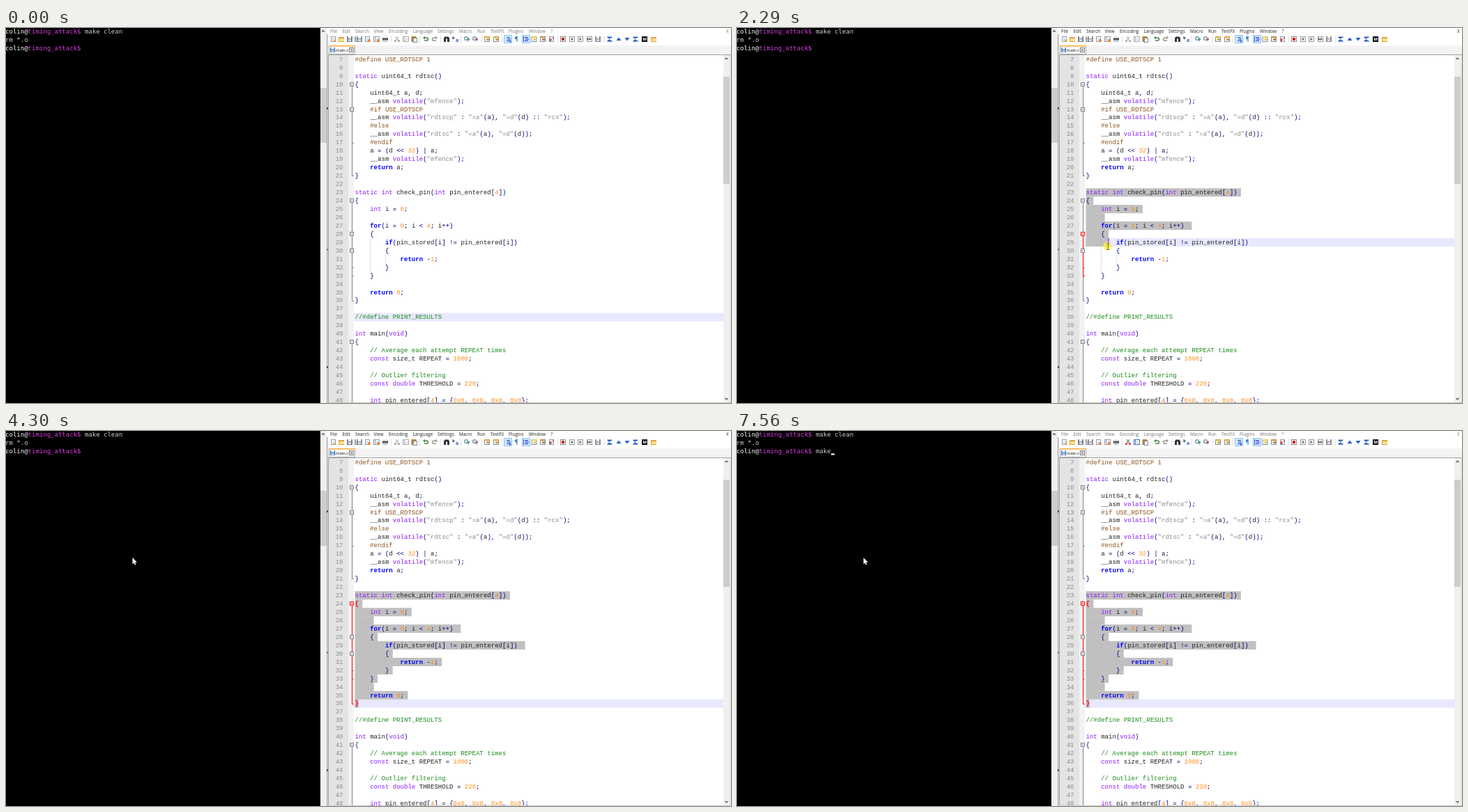
An HTML page with a canvas that plays this animation: 1040x539 px, repeating every 8000 ms.

```html
<!DOCTYPE html>
<html lang="en">
<head>
<meta charset="utf-8">
<title>Timing attack demo</title>
<style>
html, body { margin: 0; width: 100%; height: 100%; overflow: hidden; background: #fff; }
canvas { display: block; }
</style>
</head>
<body>
<canvas id="stage" width="1040" height="539"></canvas>
<script>
const c = document.getElementById('stage').getContext('2d');
const LOOP = 8000, FIRST = 7, X0 = 500.5, CW = 5.425, LH = 11.955;
const MONO = '9.04px "Liberation Mono", monospace';
const TERM = '9px "DejaVu Sans Mono", monospace';
const UI = '"Open Sans", sans-serif';

const code = `#define USE_RDTSCP 1

static uint64_t rdtsc()
{
    uint64_t a, d;
    __asm volatile("mfence");
    #if USE_RDTSCP
    __asm volatile("rdtscp" : "=a"(a), "=d"(d) :: "rcx");
    #else
    __asm volatile("rdtsc" : "=a"(a), "=d"(d));
    #endif
    a = (d << 32) | a;
    __asm volatile("mfence");
    return a;
}

static int check_pin(int pin_entered[4])
{
    int i = 0;
    ${''}
    for(i = 0; i < 4; i++) ${''}
    {
        if(pin_stored[i] != pin_entered[i]) ${''}
        {
            return -1;
        }
    }
    ${''}
    return 0;
}

//#define PRINT_RESULTS

int main(void)
{
    // Average each attempt REPEAT times
    const size_t REPEAT = 1000;

    // Outlier filtering
    const double THRESHOLD = 220;

    int pin_entered[4] = {0x0, 0x0, 0x0, 0x0};`.split('\n');

const folds = [[10, 21], [13, 17], [24, 36], [28, 33], [30, 32], [41, 60]];
const lineY = n => 45 + (n - FIRST) * LH;
const colX = k => X0 + k * CW;

function rect(color, x, y, w, h) { c.fillStyle = color; c.fillRect(x, y, w, h); }
function frame(color, x, y, w, h, fill) {
  if (fill) rect(fill, x, y, w, h);
  c.strokeStyle = color; c.lineWidth = 1;
  c.strokeRect(x + .5, y + .5, w - 1, h - 1);
}
function poly(color, ...p) {
  c.beginPath();
  for (let i = 0; i < p.length; i += 2) c.lineTo(p[i], p[i + 1]);
  c.closePath();
  c.fillStyle = color; c.fill();
}
function disc(color, x, y, r) {
  c.beginPath(); c.arc(x, y, r, 0, 7); c.fillStyle = color; c.fill();
}
function text(s, x, y, color, font) {
  c.font = font; c.fillStyle = color; c.fillText(s, x, y);
}

// --- syntax colouring ---
const token = /\/\/.*|#.*|"[^"]*"|\b\d\w*|[A-Za-z_]\w*|[^\s\w"]+/g;
function style(s) {
  if (s.startsWith('//')) return ['#198c19'];
  if (s[0] === '#') return ['#8c531a'];
  if (s[0] === '"') return ['#8c8c8c'];
  if (/^\d/.test(s)) return ['#ff8c1a'];
  if (/^(return|for|if)$/.test(s)) return ['#0000ff', 'bold '];
  if (/^(static|int|volatile|const|double|void)$/.test(s)) return ['#8c1aff'];
  if (/^\w/.test(s)) return ['#222'];
  return ['#000080'];
}
const tokens = code.map(l => [...l.matchAll(token)].map(m => [m[0], m.index, ...style(m[0])]));

// --- toolbar icons, each drawn around its centre x ---
const page = (x, col = '#8a9bb0') => {
  frame(col, x - 3, 12, 7, 8, '#fff');
  rect('#b8c8dc', x - 1, 15, 3, 1); rect('#b8c8dc', x - 1, 17, 3, 1);
};
const folder = x => {
  rect('#d9a441', x - 4, 13, 8, 7); rect('#ffe08a', x - 3, 15, 7, 4);
};
const disk = (x, col = '#7d8288') => {
  rect(col, x - 4, 12, 8, 8); rect('#fff', x - 2, 12, 4, 3); rect('#dde', x - 2, 16, 4, 3);
};
const curl = (x, d, col) => {
  c.strokeStyle = col; c.lineWidth = 1.6;
  c.beginPath(); c.moveTo(x - 3 * d, 14); c.lineTo(x + 1.5 * d, 14);
  c.arc(x + 1.5 * d, 16, 2, -1.57, 1.57, d < 0); c.lineTo(x - 2 * d, 18); c.stroke();
  poly(col, x - 4 * d, 14, x - d, 11.5, x - d, 16.5);
};
const lens = (x, col) => {
  c.strokeStyle = '#6b88a8'; c.lineWidth = 1.2;
  c.beginPath(); c.arc(x - 1, 15, 2.4, 0, 7); c.moveTo(x + 1, 17); c.lineTo(x + 3, 19); c.stroke();
  rect(col, x + 1, 15, 3, 2);
};
const pane = (x, col) => {
  frame('#7c8ca0', x - 4, 12, 8, 8, '#fff');
  rect(col, x - 4, 12, 8, 2); rect(col, x - 1, 15, 4, 3);
};
const lines = (x, col) => [0, 1, 2].forEach(i => rect(col, x - 2 + i % 2, 13 + i * 2.4, 5, 1.2));
const pressed = x => frame('#8fc4ee', x - 6, 10, 12, 12, '#d2e9fb');
const sigma = x => {
  rect('#2d5fc4', x - 3.5, 12.5, 7, 1.6); rect('#2d5fc4', x - 3.5, 18, 7, 1.6);
  poly('#2d5fc4', x - 3, 14, x + 2, 14, x - 1, 16, x + 2, 18, x - 3, 18, x, 16);
};
const button = (x, col) => frame(col, x - 4, 12, 8, 8, '#fff');

function toolbar(canCut) {
  page(469); disc('#f0a040', 472, 18, 1.6);
  folder(481); disk(493); disk(504, '#9aa'); disk(507, '#8b9096');
  page(518); disc('#f08030', 521, 18, 2);
  page(530); page(532); disc('#f08030', 534, 18, 2);
  rect('#555', 540, 14, 8, 4); rect('#eee', 541, 11.5, 6, 3); rect('#b9c4d4', 541, 17, 6, 3);

  const cut = canCut ? '#d04040' : '#a8a8a8', copy = canCut ? '#3b6fc0' : '#a8a8a8';
  c.strokeStyle = canCut ? '#556' : '#a8a8a8'; c.lineWidth = 1;
  c.beginPath(); c.moveTo(559, 12); c.lineTo(563, 18); c.moveTo(563, 12); c.lineTo(559, 18); c.stroke();
  disc(cut, 558.5, 18.5, 1.6); disc(cut, 563.5, 18.5, 1.6);
  page(572, copy); page(574, copy);
  rect('#b98236', 581.5, 12, 7, 8); frame('#7c8ca0', 584, 14, 6, 7, '#fff');
  curl(602, 1, '#4d8a50'); curl(615, -1, '#999');

  rect('#2b3440', 628, 14, 3, 6); rect('#2b3440', 633, 14, 3, 6); rect('#2b3440', 629, 12.5, 6, 3);
  text('b', 640, 16, '#234', 'bold 6px ' + UI); text('a', 645, 20, '#2d5fc4', 'bold 7px ' + UI);
  lens(661, '#3a9a4a'); lens(673, '#d04040');
  pane(690, '#d9a441'); pane(703, '#d9a441');

  pressed(720); lines(720, '#2d5fc4'); poly('#2d5fc4', 722, 17, 725, 19, 722, 21);
  text('¶', 729.5, 19, '#2d7fd0', 'bold 8px ' + UI);
  pressed(746); lines(746, '#2d3fd4'); rect('#2d3fd4', 742, 12, 1, 8);
  pane(757.5, '#e8c95a'); pane(770, '#c08a4a');
  page(782); rect('#d04040', 780, 15, 2, 4); poly('#d04040', 782, 17, 786, 12, 786, 14);

  button(799, '#888'); disc('#d01020', 799, 16, 2.2);
  button(812, '#999'); rect('#777', 810.5, 14.5, 3, 3);
  button(824, '#999'); poly('#777', 822.5, 13.5, 826, 16, 822.5, 18.5);
  button(837, '#999'); poly('#555', 834, 14, 837, 16, 834, 18); poly('#555', 837, 14, 840, 16, 837, 18);
  disk(849, '#8b9096');
  sigma(866); sigma(903);
  poly('#2d5fc4', 875.5, 18, 879, 13.5, 882.5, 18);
  poly('#2d5fc4', 887.5, 14, 891, 18.5, 894.5, 14);
  rect('#111', 912, 12, 8, 8); text('M', 913.4, 18, '#fff', 'bold 6px ' + UI);
  folder(929);

  [552, 593, 623, 652, 682, 711, 791, 858].forEach(x => rect('#e0e0e0', x, 11, 1, 10));
}

const menu = [['File', 465], ['Edit', 482.5], ['Search', 501], ['View', 527.5], ['Encoding', 549],
  ['Language', 583.5], ['Settings', 619], ['Macro', 650], ['Run', 676], ['TextFX', 695],
  ['Plugins', 721], ['Window', 750], ['?', 781.5], ['X', 1033]];

function scrollbar(x, y, h, w, top, len) {
  rect('#f0f0f0', x, y, w, h);
  rect('#cdcdcd', x, top, w, len);
}
function chevron(x, y, d) {
  c.strokeStyle = '#505050'; c.lineWidth = 1.1;
  c.beginPath(); c.moveTo(x - 2, y + d); c.lineTo(x, y - d); c.lineTo(x + 2, y + d); c.stroke();
}

function chrome(focused, canCut) {
  rect('#fff', 460, 0, 580, 25);
  for (const [s, x] of menu) text(s, x, 6.5, focused ? '#222' : '#777', '6.4px ' + UI);
  toolbar(canCut);
  rect('#f3f3f3', 460, 25, 580, 13);
  frame('#b0b0b0', 463, 25, 38, 13, '#f8f8f8');
  rect('#faaa3c', 463, 25, 38, 1.5);
  rect('#4a7fc0', 465, 28, 7, 7); rect('#fff', 466.5, 28, 4, 2.5); rect('#cfe0f4', 466.5, 32, 4, 2.5);
  text('main.c', 473, 33.6, '#111', '5.8px ' + UI);
  frame('#777', 492, 28, 7, 7, '#fff');
  c.strokeStyle = '#444';
  c.beginPath(); c.moveTo(494, 30); c.lineTo(497, 33); c.moveTo(497, 30); c.lineTo(494, 33); c.stroke();
  rect('#a0a0a0', 462, 38, 578, 1);

  scrollbar(451, 0, 539, 9, 86, 79);
  chevron(455, 4.5, 1);
  rect('#a8a8a8', 460, 9, 1, 530);
  rect('#dcdcdc', 461, 9, 1, 530);
  rect('#a0a0a0', 462, 38, 1, 501);
  rect('#222', 460, 114, 1.5, 3); rect('#667', 460, 317, 1.5, 3); rect('#223', 460, 486, 1.5, 3);
  scrollbar(1029, 39, 499, 9, 70, 154);
  chevron(1033.5, 44, 1); chevron(1033.5, 533, -1);
  rect('#e4e4e4', 1038, 39, 2, 500);
  rect('#c8c8c8', 462, 538, 578, 1);
}

function foldMarks(active) {
  const line = ([a, b], col) => {
    rect(col, 496, lineY(a) + 3, 1, lineY(b) - lineY(a) - 3);
    rect(col, 496, Math.round(lineY(b)), 3, 1);
  };
  folds.forEach(f => line(f, '#8c8c8c'));
  if (active) line(active, '#ff0000');
  for (const f of folds) {
    const y = Math.round(lineY(f[0])) - 3, col = f === active ? '#ff0000' : '#808080';
    frame(col, 493, y, 6, 6, '#fff');
    rect(col, 494.5, y + 2.5, 3, 1);
  }
}

function editor(t, caret) {
  const selecting = t >= 2060, done = t >= 2830;
  c.save();
  c.beginPath(); c.rect(463, 39, 566, 499); c.clip();
  rect('#fff', 463, 39, 566, 499);
  rect('#e4e4e4', 463, 39, 28, 499);
  rect('#f2f2f2', 491, 39, 8, 499);
  rect('#e8e8ff', 499.5, lineY(caret.line) - 6, 530, 12);
  if (selecting) for (let n = 23; n <= caret.line; n++) {
    const end = n < caret.line ? code[n - FIRST].length + 1 : caret.col;
    rect('#c0c0c0', X0, lineY(n) - LH / 2, end * CW, LH + .1);
  }
  // indent guides
  for (const [col, a, b] of [[4, 29, 32], [8, 31, 31]])
    for (let y = lineY(a) - 6; y < lineY(b) + 6; y += 2) rect('#b4b4b4', colX(col), y, .8, 1);

  tokens.forEach((line, i) => {
    const n = i + FIRST, y = lineY(n) + 2.8;
    c.textAlign = 'right';
    text(n, 483.5, y, '#8c8c8c', MONO);
    c.textAlign = 'left';
    for (const [s, col, color, weight = ''] of line) {
      const matched = done && (n === 24 || n === 36);
      text(s, colX(col), y, matched ? '#ff0000' : color, (matched ? 'bold ' : weight) + MONO);
    }
  });
  foldMarks(folds.filter(([a, b]) => caret.line >= a && caret.line <= b).pop());
  const blink = t < 3060 || (t >= 3590 && t < 4070);
  if (selecting && blink) rect('#8000ff', colX(caret.col) - .5, lineY(caret.line) - 6, 1, 12);
  c.restore();
}

function terminal(t) {
  rect('#000', 0, 0, 451, 539);
  const put = (s, col, y, color) => text(s, col * 5.418 - .9, y, color, TERM);
  const prompt = y => {
    put('colin@', 0, y, '#fff');
    put('timing_attack$', 6, y, '#d83ce0');
  };
  prompt(8.3);
  put('make clean', 21, 8.3, '#ccc');
  put('rm *.o', 0, 20.3, '#ccc');
  prompt(32.3);
  const typed = [5770, 5850, 6000, 6080].filter(k => t >= k).length;
  put('make'.slice(0, typed), 21, 32.3, '#ccc');
  const on = (t >= 4930 && t < 5390) || (t >= 5770 && t < 7010) || t >= 7560;
  if (on) rect('#f2f2f2', (21 + typed) * 5.418 - .5, 32.3, 5, 2.2);
}

// --- mouse: time, x, y ---
const path = [
  [290, 972, 536], [367, 800, 446], [444, 660, 385], [521, 591, 354],
  [600, 591, 354], [900, 562, 318], [1200, 520, 262], [1440, 501, 237],
  [1510, 498.5, 237], [1600, 498.5, 237], [1830, 501, 235.5], [1980, 501, 235.5],
  [2060, 501, 236], [2250, 528, 300], [2450, 548.5, 366], [2830, 541, 391], [2910, 542, 392],
  [3215, 542, 392], [3450, 572, 315], [3670, 591, 251], [3765, 591, 251],
  [3840, 560, 245], [3917, 420, 217], [3994, 250, 193], [4071, 182, 183], [4300, 181.5, 182]];

function mouseAt(t) {
  t = 290 + 77 * Math.floor((t - 290) / 77 + .1);
  const i = path.findIndex(p => p[0] > t);
  if (i < 0) return path[path.length - 1].slice(1);
  const [a, b] = [path[Math.max(i - 1, 0)], path[i]];
  const k = i ? (t - a[0]) / (b[0] - a[0]) : 0;
  return [a[1] + (b[1] - a[1]) * k, a[2] + (b[2] - a[2]) * k];
}

function arrow(x, y, d) {
  c.save();
  c.translate(x, y); c.scale(d, 1);
  c.beginPath();
  [[0, 0], [0, 9.2], [2, 7.4], [3.4, 10.6], [4.9, 10], [3.5, 6.9], [6.3, 6.7]].forEach(p => c.lineTo(...p));
  c.closePath();
  c.strokeStyle = '#000'; c.lineWidth = 1; c.stroke();
  c.fillStyle = '#fff'; c.fill();
  c.restore();
}
function ibeam(x, y) {
  rect('#666', x - .5, y - 4.5, 1, 9);
  rect('#666', x - 2, y - 5, 4, 1);
  rect('#666', x - 2, y + 4, 4, 1);
}
function glow(x, y) {
  const g = c.createRadialGradient(x, y, 2, x, y, 7);
  g.addColorStop(0, 'rgba(250,235,50,.8)');
  g.addColorStop(.7, 'rgba(250,238,70,.7)');
  g.addColorStop(1, 'rgba(250,240,100,0)');
  disc(g, x, y, 7);
}
function mouse(t) {
  if (t < 290) return;
  const [x, y] = mouseAt(t);
  if ((t >= 2060 && t < 3290) || (t >= 4380 && t < 4450)) glow(x - 1, y - .3);
  if (x < 490) arrow(x, y, 1);
  else if (x < 499.6) arrow(x, y, -1);
  else ibeam(x, y);
}

function caretAt(t) {
  if (t < 2060) return { line: 38, col: 0 };
  const [x, y] = mouseAt(Math.min(t, 2910));
  const line = Math.min(36, Math.max(23, Math.round((y - 45) / LH) + FIRST));
  const col = Math.min(code[line - FIRST].length, Math.max(0, Math.round((x - X0) / CW)));
  return { line, col };
}

function draw(now) {
  const t = now % LOOP;
  terminal(t);
  chrome(t >= 2060 && t < 4380, t >= 4380);
  editor(t, caretAt(t));
  mouse(t);
  requestAnimationFrame(draw);
}
requestAnimationFrame(draw);
</script>
</body>
</html>
```
